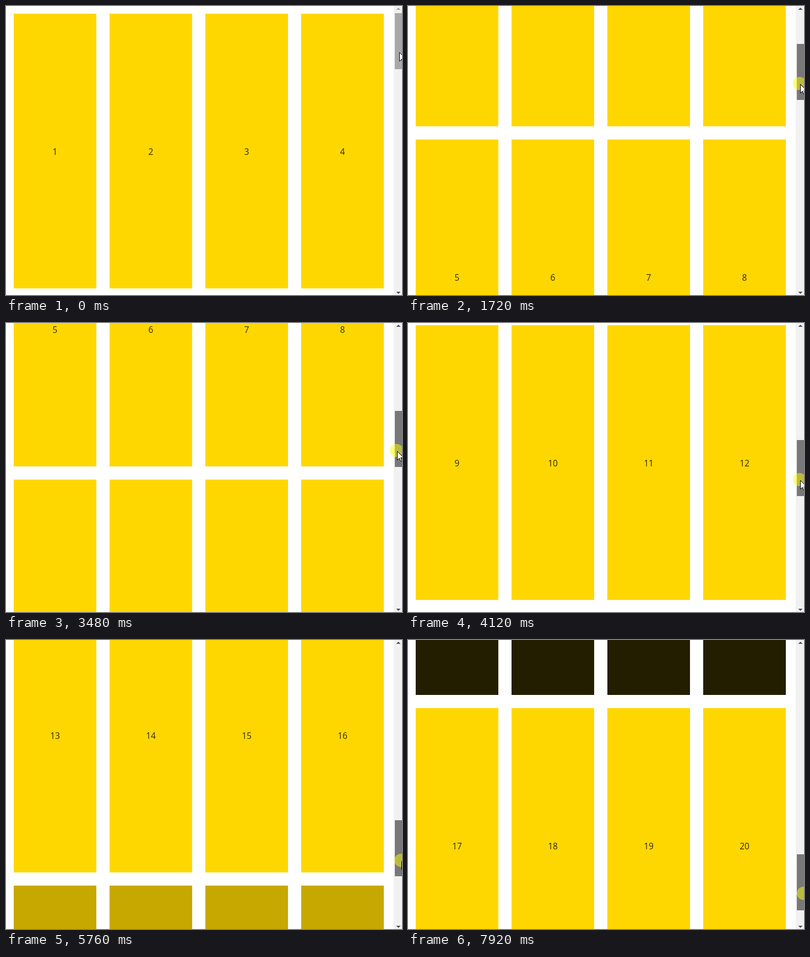
Write an HTML page that moves like this. It is 719 px wide and 526 px high and loops after 8 s.

```html
<!DOCTYPE html>
<html lang="en">
<head>
<meta charset="utf-8">
<title>Cards that light up on scroll</title>
<style>
  html, body { margin: 0; width: 100%; height: 100%; overflow: hidden; background: #fff; }
  svg { display: block; width: 719px; height: 526px; }
  rect { shape-rendering: crispEdges; }
  text { font: 15.5px "Open Sans", "Noto Sans", sans-serif; text-anchor: middle; fill-opacity: .82; }
</style>
</head>
<body>
<svg viewBox="0 0 719 526">
  <rect width="719" height="526" fill="#fff"/>
  <g id="page"></g>
  <rect x="704" width="15" height="526" fill="#f1f1f1"/>
  <path id="up" d="M708.5 7h8l-4-4z"/>
  <path d="M708.5 520h8l-4 4z" fill="#505050"/>
  <rect id="thumb" x="706" width="13" height="102"/>
  <g id="pointer">
    <circle id="halo" cx="-1" cy="-1" r="12" fill="#ff0" fill-opacity=".5"/>
    <path d="M.5 .5V16.5L4.2 13L6.7 18.6L9 17.6L6.6 12.1H11.8Z" fill="#fff" stroke="#000"/>
  </g>
</svg>
<script>
const LOOP = 8000, PRESS = 320, FADE = 500;
const START = 651, STEP = 108.5, TICK = 40;
const ROWS = 5, COLS = 4, CARD_W = 150, CARD_H = 500, GAP = 24, MARGIN = 14;
const VIEW_H = 526, PX_PER_THUMB = 5.265;

// The drag: slow start, steady pull to the bottom, short pull back
const drag = [
  { step: -1, scroll: 0, x: 714, grip: 71 },
  { step: 2, scroll: 1, x: 714, grip: 72 },
  { step: 4, scroll: 120, x: 714, grip: 73 },
  { step: 17, scroll: 499, x: 709, grip: 73 },
  { step: 26, scroll: 777, x: 710, grip: 73 },
  { step: 37, scroll: 1292, x: 713, grip: 73 },
  { step: 55, scroll: 1960, x: 722, grip: 75 },
  { step: 61, scroll: 2098, x: 722, grip: 75 },
  { step: 66.4, scroll: 2087, x: 719, grip: 72 },
  { step: 67, scroll: 1986, x: 719, grip: 72 }
];

const $ = id => document.getElementById(id);
const page = $("page"), up = $("up"), thumb = $("thumb"), pointer = $("pointer"), halo = $("halo");

function add(parent, tag, attrs, label = "") {
  const el = document.createElementNS("http://www.w3.org/2000/svg", tag);
  for (const name in attrs) el.setAttribute(name, attrs[name]);
  el.textContent = label;
  return parent.appendChild(el);
}

const rowTop = r => MARGIN + r * (CARD_H + GAP);

function sample(name, step) {
  const next = drag.findIndex(key => key.step > step);
  if (next < 0) return drag[drag.length - 1][name];
  if (next === 0) return drag[0][name];
  const a = drag[next - 1], b = drag[next];
  return a[name] + (b[name] - a[name]) * (step - a.step) / (b.step - a.step);
}

// Times at which a row comes into view
function findEntries(r) {
  const entries = [];
  let seen = false;
  for (let t = 0; t < LOOP; t++) {
    const top = rowTop(r) - sample("scroll", (t - START) / STEP);
    const inView = top < VIEW_H && top + CARD_H > 0;
    if (inView && !seen) entries.push(t || -FADE);
    seen = inView;
  }
  return entries;
}

const rows = Array.from({ length: ROWS }, (_, r) => {
  const group = add(page, "g", {});
  for (let c = 0; c < COLS; c++) {
    const x = MARGIN + c * (CARD_W + GAP), y = rowTop(r);
    add(group, "rect", { x, y, width: CARD_W, height: CARD_H });
    add(group, "text", { x: x + CARD_W / 2, y: y + 257, fill: "#000" }, r * COLS + c + 1);
  }
  return { group, entries: findEntries(r) };
});

// CSS "ease": cubic-bezier(.25, .1, .25, 1)
function ease(x) {
  if (x <= 0) return 0;
  if (x >= 1) return 1;
  const curve = (p, q, u) => 3 * p * u * (1 - u) ** 2 + 3 * q * u * u * (1 - u) + u ** 3;
  let lo = 0, hi = 1;
  for (let i = 0; i < 24; i++) {
    const mid = (lo + hi) / 2;
    if (curve(.25, .25, mid) < x) lo = mid; else hi = mid;
  }
  return curve(.1, 1, lo);
}

// The picture advances in even steps, aligned to coarse ticks
const stepTime = k => TICK * Math.round((START + STEP * k) / TICK);

function stepAt(t) {
  let k = Math.ceil((t - START) / STEP) + 1;
  while (stepTime(k) > t) k--;
  return k;
}

function draw(t) {
  const k = stepAt(t), now = stepTime(k);
  const pressed = t >= PRESS;
  const scroll = Math.round(sample("scroll", k));
  const thumbY = 13 + Math.floor(scroll / PX_PER_THUMB);

  page.setAttribute("transform", `translate(0 ${-scroll})`);
  for (const { group, entries } of rows) {
    const entered = Math.max(...entries.filter(e => e <= now));
    const level = ease((now - entered) / FADE);
    const lit = Number.isFinite(entered) ? level : 0;
    group.setAttribute("fill", `rgb(${Math.round(255 * lit)},${Math.round(215 * lit)},0)`);
  }

  up.setAttribute("fill", scroll > 0 ? "#505050" : "#a3a3a3");
  thumb.setAttribute("y", thumbY);
  thumb.setAttribute("fill", pressed ? "#787878" : "#a8a8a8");
  halo.setAttribute("visibility", pressed ? "visible" : "hidden");
  const x = Math.round(sample("x", k)), y = Math.round(thumbY + sample("grip", k));
  pointer.setAttribute("transform", `translate(${x} ${y})`);
}

const origin = performance.now();
function tick() {
  draw((performance.now() - origin) % LOOP);
  requestAnimationFrame(tick);
}
tick();
</script>
</body>
</html>
```
